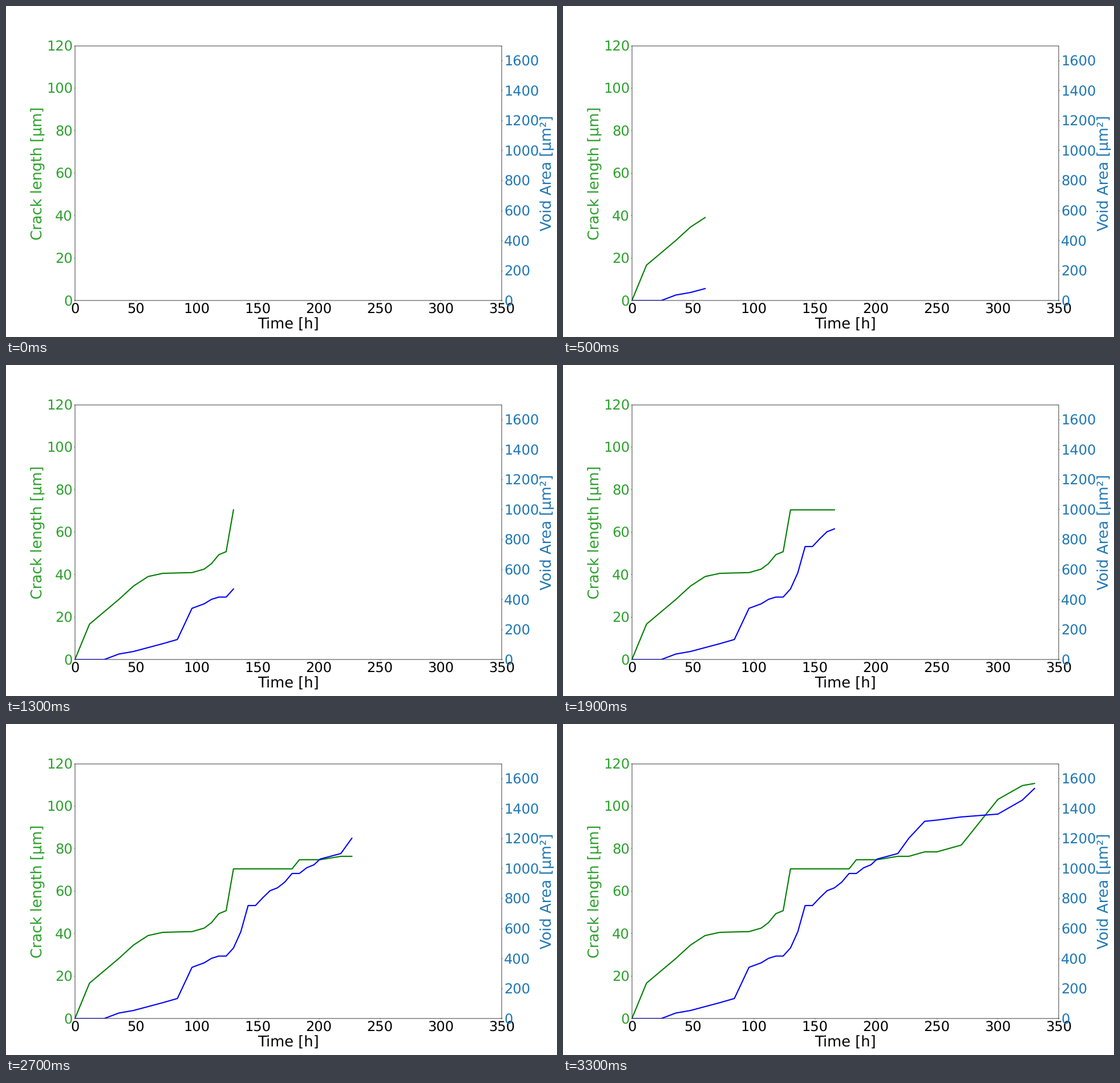
A matplotlib script that plays this animation: 966 px wide and 580 px high, repeating every 3.4 s.

```python
import matplotlib.pyplot as plt
from matplotlib.animation import FuncAnimation

DPI = 64
PX = 72 / DPI        # one pixel in points
PT = 966 / 25 / DPI  # sizes are set for a 25 inch wide sheet

plt.rcParams.update({
    "font.family": "DejaVu Sans",
    "text.hinting": "none",
    "axes.linewidth": 0.8 * PT,
    "axes.labelpad": 4 * PT,
    "axes.labelsize": 48 * PT,
})

hours = [0, 12, 24, 36, 48, 60, 72, 84, 96, 106, 112, 118, 124, 130, 136, 142,
         148, 154, 160, 166, 172, 178, 184, 190, 196, 201, 218, 227, 240, 250,
         270, 300, 320, 330]
crack = [0, 16.7, 22.5, 28.3, 34.6, 39.1, 40.6, 40.8, 40.95, 42.6, 45.2, 49.4,
         50.8] + [70.5] * 9 + [74.8] * 4 + [76.4, 76.4, 78.5, 78.5, 81.7,
         103.2, 109.7, 110.7]
void = [0, 0, 0, 37, 54, 80, 106, 134, 342, 372, 402, 417, 417, 471, 579, 754,
        754, 806, 853, 872, 910, 968, 968, 1006, 1026, 1064, 1101, 1203, 1316,
        1324, 1345, 1364, 1457, 1535]

fig = plt.figure(figsize=(966 / DPI, 580 / DPI), dpi=DPI, facecolor="white")
ax = fig.add_axes([0.125, 0.11, 0.775, 0.77])
twin = ax.twinx()


def style_y(axes, label, color, top, step):
    axes.set_ylim(0, top)
    axes.set_yticks(range(0, top + 1, step))
    axes.set_ylabel(label, color=color)
    axes.tick_params(axis="y", labelcolor=color)
    axes.tick_params(labelsize=45 * PT, length=3.5 * PT,
                     width=0.8 * PT, pad=3.5 * PT)


style_y(ax, "Crack length [µm]", "tab:green", 120, 20)
style_y(twin, "Void Area [µm²]", "tab:blue", 1700, 200)
ax.set_xlim(0, 350)
ax.set_xticks(range(0, 351, 50))
ax.set_xlabel("Time [h]")

crack_line, = ax.plot([], [], color="green", lw=2.1 * PX)
void_line, = twin.plot([], [], color="blue", lw=2.1 * PX)


def update(i):
    # A single point draws nothing, so the plot starts empty.
    n = i + 1 if i else 0
    crack_line.set_data(hours[:n], crack[:n])
    void_line.set_data(hours[:n], void[:n])
    return crack_line, void_line


anim = FuncAnimation(fig, update, frames=len(hours), interval=100,
                     repeat=True, repeat_delay=0)
plt.show()
```
